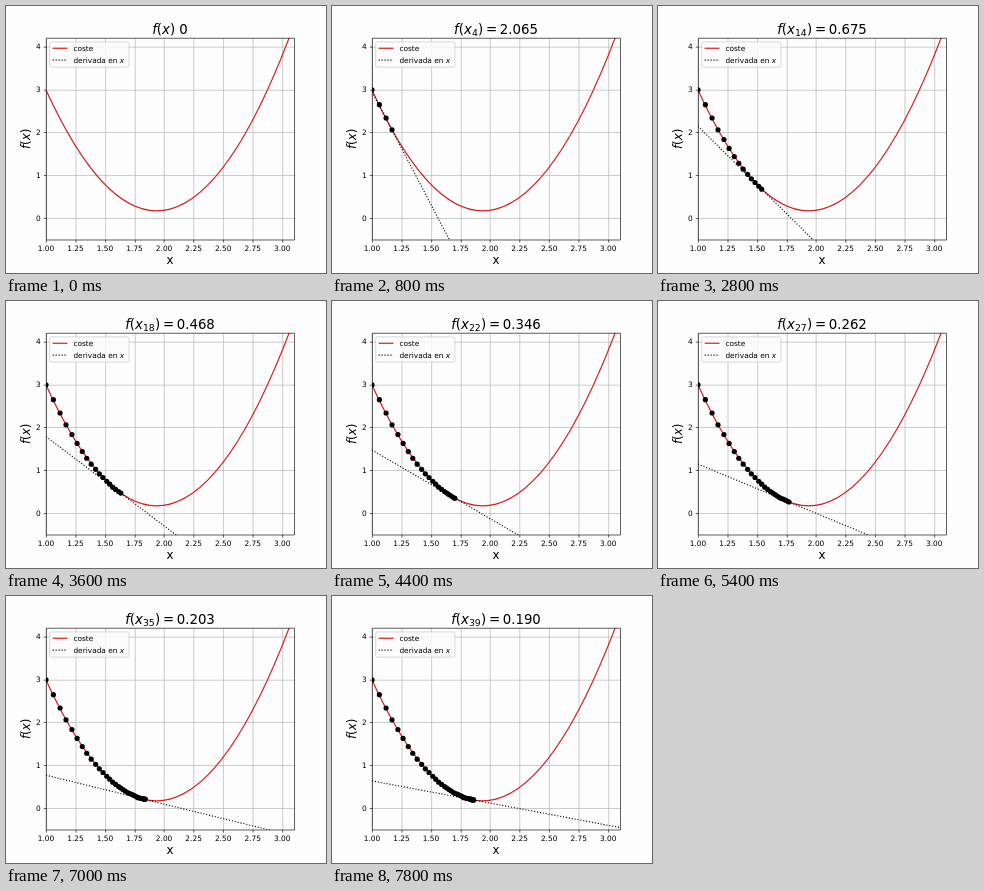
Animation, 320 px wide and 267 px high, one loop 8 s. Source, as an HTML page:

```html
<!DOCTYPE html>
<html lang="es">
<head>
<meta charset="utf-8">
<style>
  html, body { margin: 0; width: 100%; height: 100%; overflow: hidden; background: #fdfdfd; }
  svg { display: block; width: 100%; height: 100%; font-family: "DejaVu Sans", sans-serif; font-size: 10px; }
  .it { font-style: italic; }
  .grid { stroke: #b0b0b0; stroke-width: .85; }
  .axis { stroke: #000; stroke-width: .85; fill: none; }
  .cost { stroke: #d91e22; stroke-width: 1.6; fill: none; }
  .tangent { stroke: #000; stroke-width: 1.5; stroke-dasharray: 1.5 2.475; fill: none; }
  .mid { text-anchor: middle; }
  .end { text-anchor: end; }
  .title { font-size: 18px; }
  .label { font-size: 16px; }
</style>
</head>
<body>
<svg viewBox="0 0 432 360" preserveAspectRatio="none">
  <defs><clipPath id="area"><rect x="54" y="43.2" width="334.8" height="271.8"/></clipPath></defs>
  <g id="grid"></g>
  <g clip-path="url(#area)">
    <path id="curve" class="cost"/>
    <path id="tangent" class="tangent"/>
    <g id="dots"></g>
  </g>
  <g id="ticks"></g>
  <path class="axis" d="M54.5 43.5H389.5V315.5H54.5Z"/>
  <rect x="59" y="48.4" width="107" height="34" rx="2" fill="#fdfdfd" fill-opacity=".8" stroke="#ccc"/>
  <path class="cost" d="M63 57H83"/>
  <path class="tangent" d="M63 73H83"/>
  <text x="91" y="60.5">coste</text>
  <text x="91" y="76.3">derivada en <tspan class="it">x</tspan></text>
  <text class="mid label" x="221.4" y="348">x</text>
  <text class="mid label" transform="translate(33 179.1) rotate(-90)"><tspan class="it">f</tspan>(<tspan class="it">x</tspan>)</text>
  <text id="title" class="mid title" x="221.4" y="37.2"></text>
</svg>
<script>
const $ = id => document.getElementById(id);

// Gradient descent on a parabola
const A = 3.205, MIN_X = 1.9375, MIN_F = 0.172, RATE = 0.01;
const STEP = 200, STEPS = 40;
const f = x => A * (x - MIN_X) ** 2 + MIN_F;
const slope = x => 2 * A * (x - MIN_X);

const X0 = 1, X1 = 3.1;
const px = x => 54 + (x - X0) * 334.8 / (X1 - X0);
const py = y => 315 - (y + 0.5) * 271.8 / 4.7;
const point = (x, y) => `${px(x).toFixed(2)} ${py(y).toFixed(2)}`;
// Straight rules sit on whole plot pixels
const snap = p => Math.round(p) + 0.5;

const xs = [X0];
while (xs.length < STEPS) {
  const x = xs[xs.length - 1];
  xs.push(x - RATE * slope(x));
}

function drawAxes() {
  let grid = '', ticks = '';
  for (let x = 1; x <= 3; x += 0.25) {
    const p = snap(px(x));
    grid += `<path class="grid" d="M${p} 43.5V315.5"/>`;
    ticks += `<path class="axis" d="M${p} 315.5v3.5"/><text class="mid" x="${px(x)}" y="330">${x.toFixed(2)}</text>`;
  }
  for (let y = 0; y <= 4; y++) {
    const p = snap(py(y));
    grid += `<path class="grid" d="M54.5 ${p}H389.5"/>`;
    ticks += `<path class="axis" d="M54.5 ${p}h-3.5"/><text class="end" x="47" y="${py(y) + 3.9}">${y}</text>`;
  }
  $('grid').innerHTML = grid;
  $('ticks').innerHTML = ticks;

  const mid = (X0 + X1) / 2;
  const control = f(X0) + slope(X0) * (mid - X0);
  $('curve').setAttribute('d', `M${point(X0, f(X0))}Q${point(mid, control)} ${point(X1, f(X1))}`);
}

function titleText(n) {
  const head = '<tspan class="it">f</tspan>(<tspan class="it">x</tspan>';
  if (!n) return head + ') 0';
  return `${head}<tspan font-size="12.6" dy="2.9">${n}</tspan><tspan dx=".3" dy="-2.9">)</tspan>` +
    `<tspan dx="3.6">=</tspan><tspan dx="3.6">${f(xs[n - 1]).toFixed(3)}</tspan>`;
}

function tangentPath(n) {
  if (n < 2) return '';
  const x = xs[n - 2], at = u => f(x) + slope(x) * (u - x);
  return `M${point(X0, at(X0))}L${point(X1, at(X1))}`;
}

let shown = -1;
function render(ms) {
  const n = Math.floor(ms / STEP) % STEPS;
  if (n === shown) return;
  shown = n;
  $('title').innerHTML = titleText(n);
  $('tangent').setAttribute('d', tangentPath(n));
  $('dots').innerHTML = xs.slice(0, n)
    .map(x => `<circle cx="${Math.round(px(x))}" cy="${Math.round(py(f(x)))}" r="3.5"/>`).join('');
}

drawAxes();
render(0);
const start = performance.now();
(function tick() {
  render(performance.now() - start);
  requestAnimationFrame(tick);
})();
</script>
</body>
</html>
```
